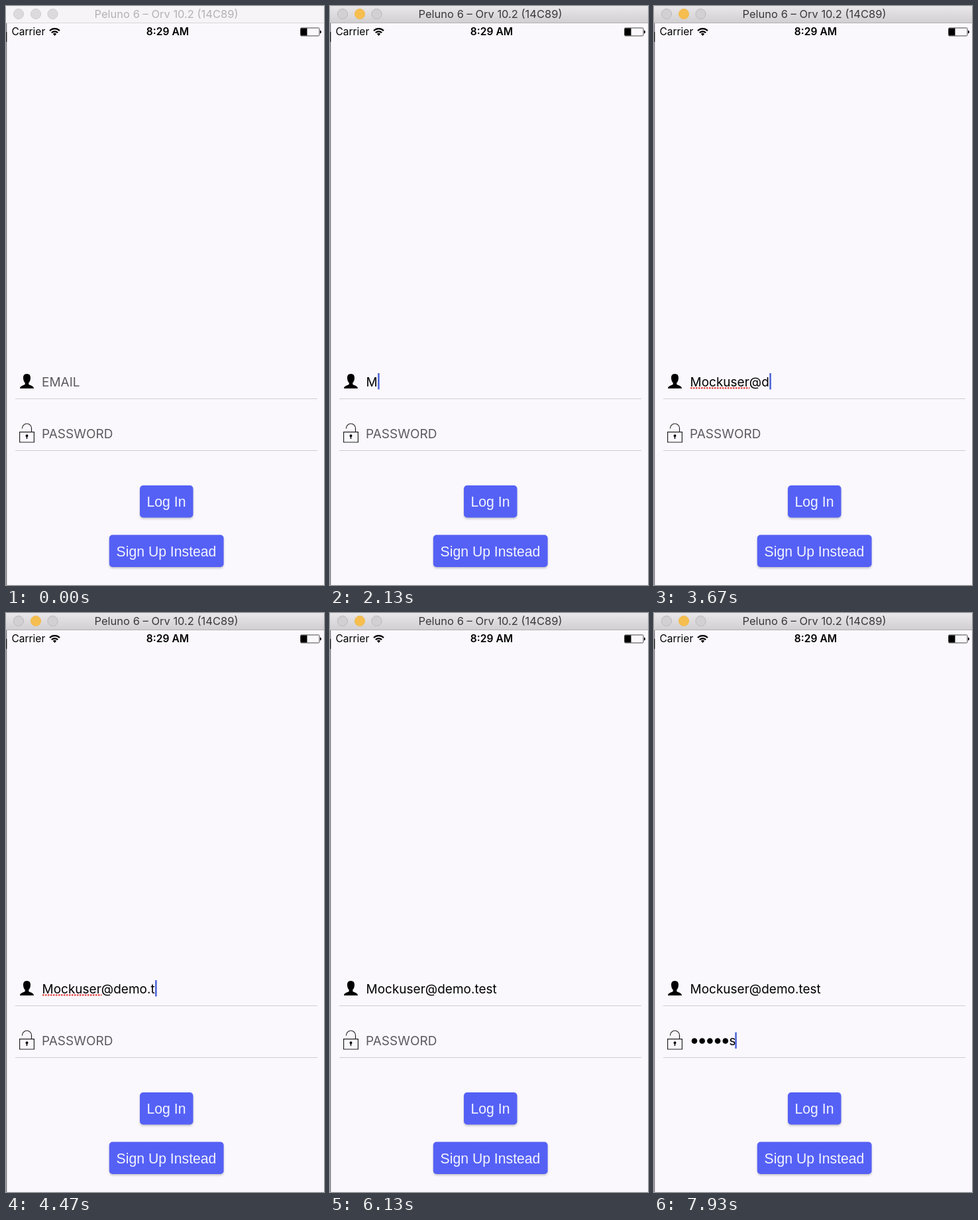
Recreate the animation shown at these times as an HTML page. Size 480 px wide and 872 px high, loop 8 s.

```html
<!DOCTYPE html>
<html lang="en">
<head>
<meta charset="utf-8">
<title>Login form</title>
<style>
  html, body { margin: 0; width: 100%; height: 100%; overflow: hidden; background: #faf8fd; }
  svg { display: block; width: 100vw; height: 100vh; }
  text { font-family: Inter, Roboto, sans-serif; white-space: pre; }
  .field { font-size: 19px; }
  .hint { fill: #5c5a5f; }
  .button rect { fill: #5561f5; filter: drop-shadow(0 2px 1.5px #0003); }
  .button text { font: 21.2px "Liberation Sans", Arial, sans-serif; fill: #f4f4ff; text-anchor: middle; }
</style>
</head>
<body>
<svg viewBox="0 0 480 872">
  <defs>
    <linearGradient id="chrome" x2="0" y2="1">
      <stop stop-color="#e9e7e9"/><stop offset="1" stop-color="#d1cfd1"/>
    </linearGradient>
  </defs>
  <rect width="480" height="872" fill="#faf8fd"/>

  <rect id="bar" width="480" height="25"/>
  <path id="edge" d="M0 25.5H480"/>
  <g id="lights">
    <circle cx="19" cy="12" r="7.6"/><circle cx="45" cy="12" r="7.6"/><circle cx="70.5" cy="12" r="7.6"/>
  </g>
  <text id="title" x="242" y="18" font-size="16.5" text-anchor="middle">Peluno 6 – Orv 10.2 (14C89)</text>
  <path d="M.6 26V872" stroke="#777579" stroke-width="1.3"/>
  <path d="M.6 39V54" stroke="#111" stroke-width="1.3"/>

  <text x="8.5" y="44.3" font-size="15.5">Carrier</text>
  <g fill="none" stroke="#000" stroke-width="2.1">
    <path d="M66 37.3a10.5 10.5 0 0 1 15 0M68.8 40.3a6.6 6.6 0 0 1 9.4 0"/>
    <path d="M70.9 42.1a3.7 3.7 0 0 1 5.2 0L73.5 45z" fill="#000" stroke="none"/>
  </g>
  <text x="244" y="44.3" font-size="15.6" font-weight="600" text-anchor="middle">8:29 AM</text>
  <rect x="444.5" y="33" width="28.5" height="12" rx="1.5" fill="none" stroke="#444"/>
  <path d="M445 33.5h9.5v11h-9.5zM474 36.500q2 .5 2 2.500t-2 2.500z"/>

  <path d="M31.5 554c-4 0-5.7 2.8-5.5 6.5.2 3.5 1.2 5.5 2.7 7v2.2c-1 1.8-7.4 1.6-7.7 6.3h21c-.3-4.7-6.7-4.5-7.7-6.3v-2.2c1.5-1.5 2.5-3.5 2.7-7 .2-3.7-1.5-6.5-5.5-6.5z"/>
  <path d="M20.6 641.6h21.8v15.4h-21.8zM24.5 636.5v-.5a7 7 0 0 1 14 0v5.5" fill="none" stroke="#222" stroke-width="1.2"/>
  <circle cx="31.5" cy="647.2" r="1.9"/>
  <path d="M30.8 648h1.4v4h-1.4z"/>
  <path d="M14 591.5H470M14 669.5H470" stroke="#cfcdd2" stroke-width="1.2"/>

  <text id="mailHint" class="field hint" x="54" y="572.7">EMAIL</text>
  <text id="passHint" class="field hint" x="54" y="650.7">PASSWORD</text>
  <path id="squiggle" fill="none" stroke="#e23b36" stroke-width="2.3" stroke-dasharray="2.5 1.5"/>
  <text id="mail" class="field" x="54.5" y="572.7"></text>
  <g id="dots"></g>
  <text id="pass" class="field" y="650.7"></text>
  <rect id="caret" width="2.5" height="24.5" fill="#4a62d6"/>

  <g class="button">
    <rect x="202" y="722" width="80.5" height="48.5" rx="5"/>
    <text x="242" y="754">Log In</text>
  </g>
  <g class="button">
    <rect x="155.8" y="796.5" width="172.8" height="48.5" rx="5"/>
    <text x="242" y="828.5">Sign Up Instead</text>
  </g>
</svg>
<script>
  const LOOP = 8000, ACTIVE = 870, MAIL_FOCUS = 1050, BLUR = 6070, PASS_FOCUS = 6250;
  const LEFT = 55, DOT = 11.7;
  const EMAIL = "Mockuser@demo.test", SECRET = "drifts";

  const $ = id => document.getElementById(id);
  const show = (el, on) => el.setAttribute("visibility", on ? "visible" : "hidden");
  const paint = (el, fill, stroke) => {
    el.setAttribute("fill", fill);
    el.setAttribute("stroke", stroke || "none");
  };

  // Keystroke times: a slower middle part, then a quick ending.
  const mailKeys = [...EMAIL].map((_, i) =>
    i < 6 ? 2125 + i * 148 : i < 15 ? 2865 + (i - 5) * 178 : 4467 + (i - 14) * 130);
  const passKeys = [...SECRET].map((_, i) => 7265 + i * 131);
  const typed = (keys, t) => keys.filter(k => k <= t).length;

  $("dots").innerHTML = [...SECRET].map((_, i) =>
    `<circle cx="${LEFT + 6 + i * DOT}" cy="644.5" r="4.3"/>`).join("");
  const dots = [...$("dots").children];
  const lights = [...$("lights").children];

  // Solid for half a second after activity, then fading out and in.
  function blink(age) {
    const p = age % 1000;
    const level = p < 700 ? (700 - p) / 200 : (p - 850) / 150;
    return Math.max(0, Math.min(1, level));
  }

  function drawWindow(active) {
    paint($("bar"), active ? "url(#chrome)" : "#f6f4f6");
    paint($("edge"), "none", active ? "#b3b1b3" : "#d9d7d9");
    paint($("title"), active ? "#3a383c" : "#b4b2b5");
    lights.forEach((el, i) => active && i === 1
      ? paint(el, "#f6be4f", "#f0bb55")
      : paint(el, active ? "#d2d0d2" : "#dcdadc", active ? "#bcbabc" : "#d0ced0"));
  }

  function draw(t) {
    drawWindow(t >= ACTIVE);

    const n = typed(mailKeys, t), m = typed(passKeys, t);
    const mail = $("mail"), pass = $("pass"), caret = $("caret");
    mail.textContent = EMAIL.slice(0, n);
    show($("mailHint"), !n);
    show($("passHint"), !m);

    const misspelt = n > 8 && t < BLUR;
    show($("squiggle"), misspelt);
    if (misspelt) $("squiggle").setAttribute("d", `M${LEFT} 575.3h${mail.getSubStringLength(0, 8)}`);

    dots.forEach((el, i) => show(el, i < m - 1));
    const passX = LEFT + Math.max(0, m - 1) * DOT;
    pass.setAttribute("x", passX);
    pass.textContent = m ? SECRET[m - 1] : "";

    const onPass = t >= PASS_FOCUS;
    const last = onPass ? passKeys[m - 1] || PASS_FOCUS : mailKeys[n - 1] || MAIL_FOCUS;
    const x = onPass
      ? passX + (m ? pass.getComputedTextLength() - 1.2 : 0)
      : LEFT + (n ? mail.getComputedTextLength() : 0);
    show(caret, onPass || (t >= MAIL_FOCUS && t < BLUR));
    caret.setAttribute("x", x);
    caret.setAttribute("y", onPass ? 631.5 : 553);
    caret.setAttribute("opacity", blink(Math.max(0, t - last)));
  }

  function tick() {
    draw(performance.now() % LOOP);
    requestAnimationFrame(tick);
  }
  tick();
</script>
</body>
</html>
```
